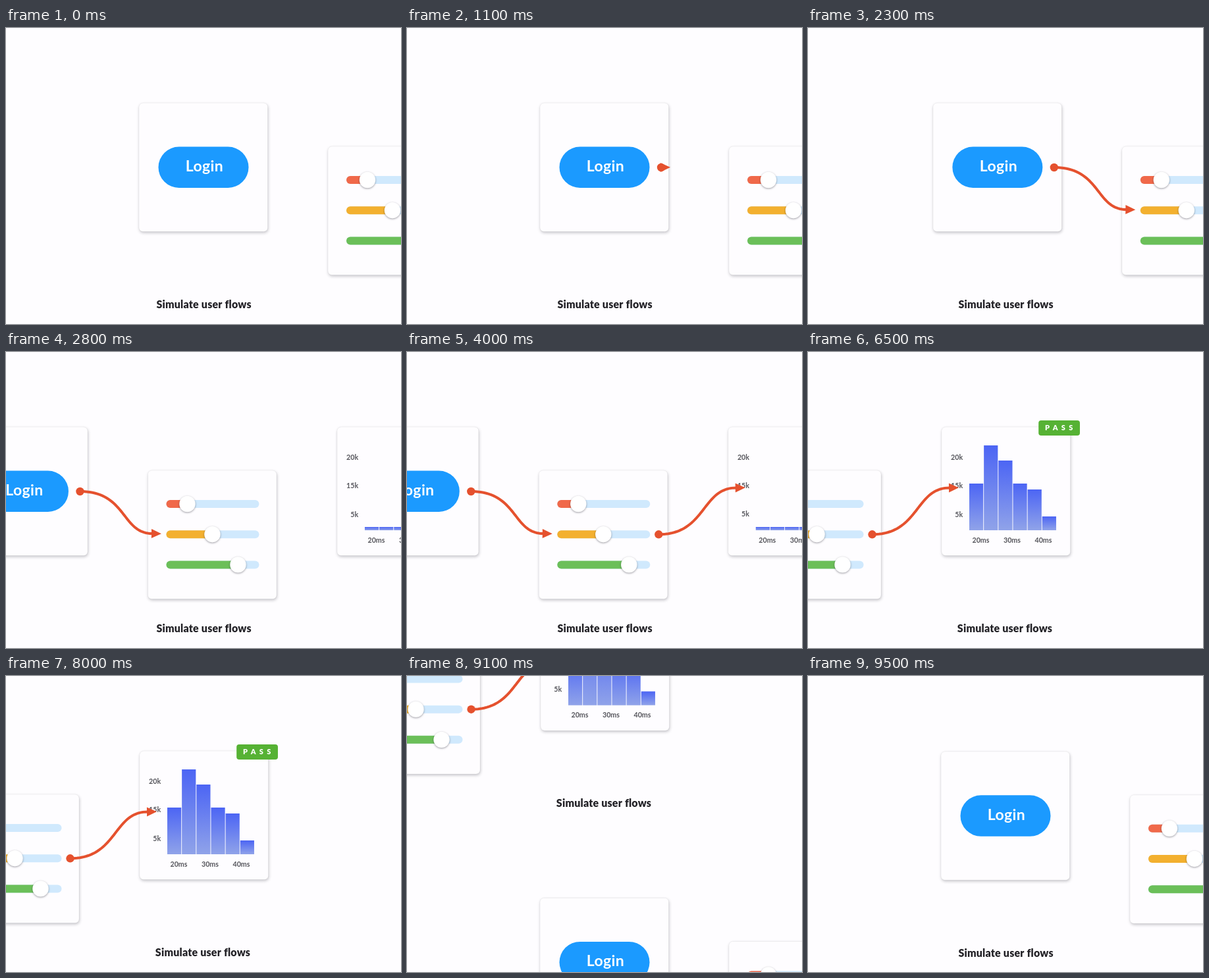
Animation, 600 px wide and 450 px high, one loop 9600 ms. Source, as an HTML page with a canvas:

```html
<!DOCTYPE html>
<html lang="en">
<head>
<meta charset="utf-8">
<title>Simulate user flows</title>
<style>
  html, body { margin: 0; width: 100%; height: 100%; overflow: hidden; background: #fefdff; }
  canvas { display: block; }
</style>
</head>
<body>
<canvas id="stage" width="600" height="450"></canvas>
<script>
const LOOP = 9600, W = 600, H = 450;
const PAPER = '#fefdff', RED = '#e5512e';
const ctx = document.getElementById('stage').getContext('2d');

const progress = (t, start, length) => Math.min(1, Math.max(0, (t - start) / length));
const easeInOut = (p, k = 3.5) => p < .5 ? (2 * p) ** k / 2 : 1 - (2 - 2 * p) ** k / 2;
const easeOut = p => 1 - (1 - p) ** 3;
const glide = (t, start, length = 1000) => easeInOut(progress(t, start, length));
const mix = (a, b, p) => a + (b - a) * p;

function box(x, y, w, h, r, fill) {
  ctx.beginPath();
  ctx.roundRect(x, y, w, h, r);
  ctx.fillStyle = fill;
  ctx.fill();
}

function disc(x, y, r, fill) {
  ctx.beginPath();
  ctx.arc(x, y, r, 0, 2 * Math.PI);
  ctx.fillStyle = fill;
  ctx.fill();
}

function label(text, x, y, size, fill, align = 'center', weight = 700, spacing = 0) {
  ctx.font = `${weight} ${size}px Lato, sans-serif`;
  ctx.letterSpacing = spacing + 'px';
  ctx.textAlign = align;
  ctx.fillStyle = fill;
  ctx.fillText(text, x, y);
}

function withShadow(alpha, blur, dx, dy, paint) {
  ctx.save();
  ctx.shadowColor = `rgba(40, 40, 50, ${alpha})`;
  ctx.shadowBlur = blur;
  ctx.shadowOffsetX = dx;
  ctx.shadowOffsetY = dy;
  paint();
  ctx.restore();
}

function scaled(x, y, s, paint) {
  ctx.save();
  ctx.translate(x, y);
  ctx.scale(s, s);
  ctx.translate(-x, -y);
  paint();
  ctx.restore();
}

function card(x, y) {
  withShadow(.27, 4, .7, 2, () => box(x, y, 195.5, 195.5, 6, PAPER));
  ctx.strokeStyle = 'rgba(40, 40, 50, .05)';
  ctx.lineWidth = 1;
  ctx.stroke();
}

function loginCard(t) {
  card(202, 114);
  const press = Math.sin(Math.PI * progress(t, 600, 400));
  scaled(300, 211.5, 1 - .05 * press, () => {
    box(231.5, 180.5, 137, 62.5, 31.25, '#1b9aff');
    label('Login', 301.5, 218, 23, '#fff', 'center', 700, .4);
  });
}

function slidersCard() {
  card(489, 180);
  [['#f0694a', 549], ['#f3b02f', 587], ['#6bbf59', 626]].forEach(([color, x], i) => {
    const y = 231 + i * 46.2;
    box(517, y - 6, 141, 12, 6, '#d0e9fd');
    box(517, y - 6, x - 517, 12, 6, color);
    withShadow(.45, 3, 0, 1, () => disc(x, y, 12.2, '#fff'));
  });
}

function chartCard(t) {
  const grow = easeInOut(progress(t, 5000, 900), 2);
  const size = 1 - .047 * (glide(t, 3854) - easeOut(progress(t, 5000, 500)));
  scaled(874, 211.7, size, () => {
    card(776.5, 114);
    ['20k', '15k', '5k'].forEach((s, i) => label(s, 808.7, 164.3 + i * 43.1, 10.7, '#56565c', 'right'));
    ['20ms', '30ms', '40ms'].forEach((s, i) => label(s, 836 + i * 47.5, 290, 10.7, '#56565c'));
    [71, 129, 106, 71, 62, 21].forEach((full, i) => {
      const h = mix(5, full, grow), top = 271 - h;
      const shade = ctx.createLinearGradient(0, top, 0, 271);
      shade.addColorStop(0, '#4c65f4');
      shade.addColorStop(1, '#90a3e9');
      box(818.5 + i * 22.15, top, 21.2, h, 0, shade);
    });
  });
}

function badge(t) {
  const p = progress(t, 5800, 400);
  if (!p) return;
  ctx.save();
  ctx.globalAlpha = easeOut(p);
  ctx.translate(0, 16 * (1 - easeOut(p)));
  box(923.7, 104, 62.8, 23, 4, '#56b234');
  label('PASS', 933.5, 119.4, 11, '#fff', 'left', 900, 5.3);
  ctx.restore();
}

// S-shaped connector whose head travels with the drawn end
function arrow(x0, y0, x1, y1, c0, c1, p) {
  if (!p) return;
  const point = u => {
    const v = 1 - u, a = v * v * v, b = 3 * v * v * u, c = 3 * v * u * u, d = u * u * u;
    return [a * x0 + b * c0 + c * c1 + d * x1, (a + b) * y0 + (c + d) * y1];
  };
  ctx.beginPath();
  for (let i = 0; i <= 40; i++) ctx.lineTo(...point(p * i / 40));
  ctx.strokeStyle = RED;
  ctx.lineWidth = 4;
  ctx.stroke();
  disc(x0, y0, 6.2, RED);

  const [x, y] = point(p), [bx, by] = point(p - .01);
  ctx.save();
  ctx.translate(x, y);
  ctx.rotate(Math.atan2(y - by, x - bx));
  ctx.beginPath();
  ctx.moveTo(-1, -7);
  ctx.lineTo(14, 0);
  ctx.lineTo(-1, 7);
  ctx.fill();
  ctx.restore();
}

function scene(t) {
  const second = glide(t, 3854);
  ctx.save();
  ctx.translate(-286.75 * (glide(t, 2054) + second), 0);
  loginCard(t);
  slidersCard();
  chartCard(t);
  arrow(386, 212, 495.5, 276, 457, 449, glide(t, 1100, 900));
  arrow(671, 277.3, 788.5, 206.5, 743, 736, glide(t, 3050, 800));
  badge(t);
  ctx.restore();
  label('Simulate user flows', 300.6 - 1.6 * second, 426, 16, '#232227', 'center', 900, .2);
}

function draw(now) {
  const t = now % LOOP;
  const push = H * glide(t, 8600);
  ctx.fillStyle = PAPER;
  ctx.fillRect(0, 0, W, H);
  ctx.save();
  ctx.translate(0, -push);
  scene(t);
  if (push) {
    ctx.translate(0, H);
    scene(0);
  }
  ctx.restore();
}

const start = performance.now();
function tick() {
  draw(performance.now() - start);
  requestAnimationFrame(tick);
}
tick();
</script>
</body>
</html>
```
